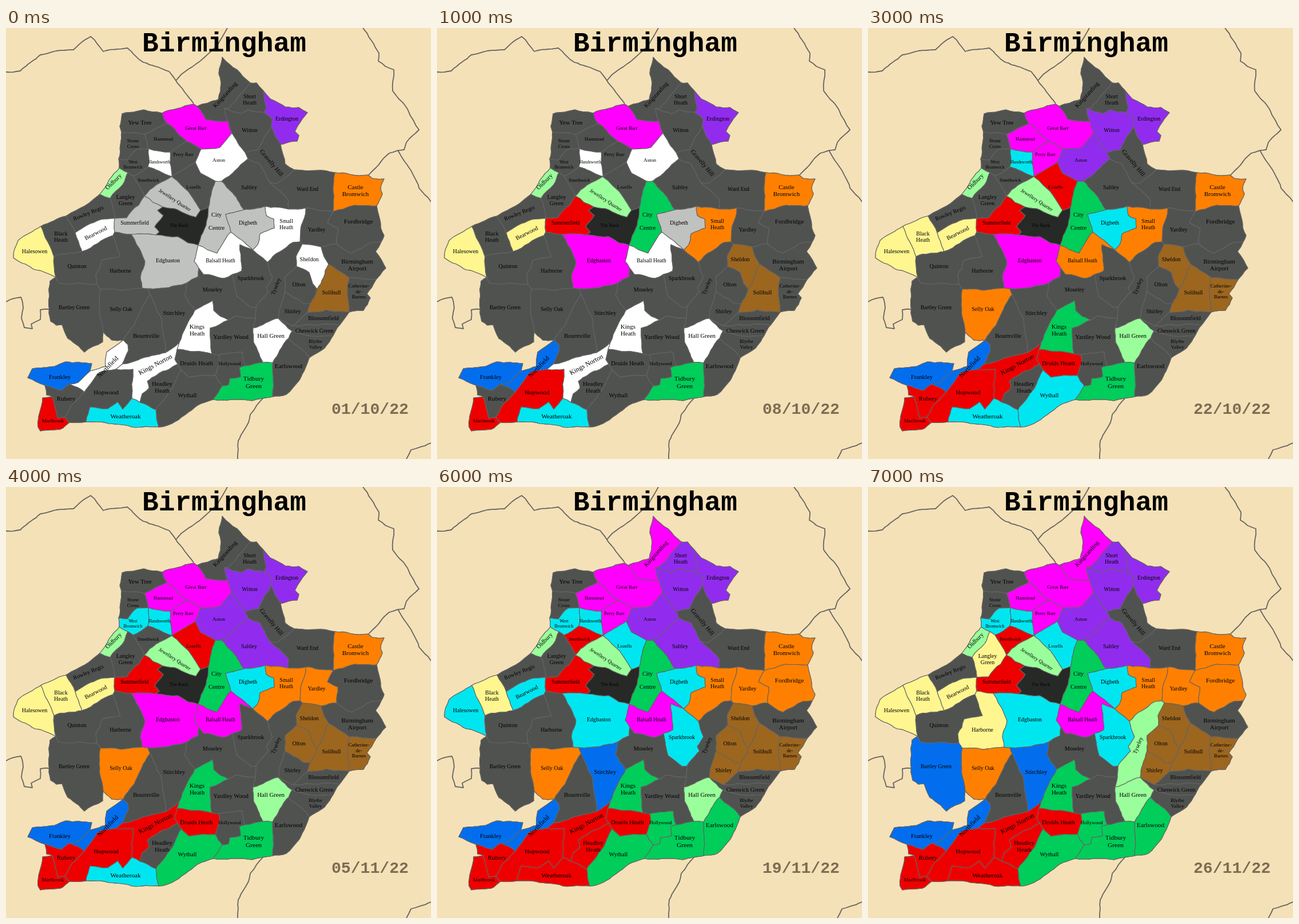
Write an HTML page that moves like this. It is 743 px wide and 754 px high and loops after 8000 ms.

```html
<!DOCTYPE html>
<html lang="en">
<head>
<meta charset="utf-8">
<title>Territory map</title>
<style>
html, body { margin: 0; width: 100%; height: 100%; overflow: hidden; background: #f5e1b7; }
svg { display: block; width: 100vw; height: 100vh; }
#roads, #map, #rim { stroke: #646464; stroke-linejoin: round; }
#roads { fill: none; stroke-width: 1.8; }
#rim { stroke-width: 3.6; }
#map { stroke-width: 1.1; }
#labels { font-family: "Liberation Serif", serif; text-anchor: middle; }
.mono { font-family: "Liberation Mono", monospace; font-weight: bold; }
</style>
</head>
<body>
<svg viewBox="0 0 743 754">
  <g id="roads"></g>
  <use id="rim" href="#map"/>
  <g id="map"></g>
  <g id="labels"></g>
  <text class="mono" x="238" y="41" font-size="47.8">Birmingham</text>
  <text class="mono" id="date" x="569" y="675" font-size="28.1" fill="#7d6c53"></text>
</svg>
<script>
const $ = id => document.getElementById(id);
const areas = {};

function add(parent, tag, attrs) {
  const el = document.createElementNS('http://www.w3.org/2000/svg', tag);
  for (const k in attrs) el.setAttribute(k, attrs[k]);
  return parent.appendChild(el);
}

// Seeded value from -1 to 1
function noise(a, b) {
  const s = Math.sin(a * 12.9898 + b * 78.233) * 43758.5453;
  return (s - Math.floor(s)) * 2 - 1;
}

// Midpoint displacement; the same in both directions, so neighbours share one border
function wiggle(a, b) {
  const len = Math.hypot(a[0] - b[0], a[1] - b[1]);
  if (len < 10) return [b];
  const sx = a[0] + b[0], sy = a[1] + b[1], push = Math.min(len, 30) * 0.06;
  const mid = [sx / 2 + noise(sx, sy) * push, sy / 2 + noise(sy, sx) * push];
  return [...wiggle(a, mid), ...wiggle(mid, b)];
}

function coast(keys, closed) {
  const pts = keys.split(' ').map(p => p.split(',').map(Number));
  if (closed) pts.push(pts[0]);
  const line = pts.flatMap((p, i) => i ? wiggle(pts[i - 1], p) : [p]);
  return 'M' + line.map(p => p.map(v => v.toFixed(1))).join('L') + (closed ? 'Z' : '');
}

const road = keys => add($('roads'), 'path', { d: coast(keys) });

// "|" breaks the label into lines; x, y is its centre
function area(name, x, y, keys, size = 10, turn = 0) {
  const key = name.replace(/-\|/g, '-').replace(/\|+/g, ' ');
  areas[key] = add($('map'), 'path', { d: coast(keys, true) });
  const lines = name.split('|');
  const label = add($('labels'), 'text', { 'font-size': size, transform: `translate(${x} ${y}) rotate(${turn})` });
  lines.forEach((line, i) => {
    const dy = (i - (lines.length - 1) / 2) * size * 1.1 + size * 0.3;
    add(label, 'tspan', { x: 0, y: dy }).textContent = line;
  });
}

road('0,77 25,75 60,47 88,40 118,38 148,15 170,41 212,35 240,60 285,76 297,92 328,132');
road('297,92 345,53 370,30 387,0');
road('624,0 652,44 651,58 678,73 676,110 702,142 722,178 700,200 696,213 670,219 634,257');
road('685,214 701,239 722,280 743,304');
road('0,479 26,471 30,490 27,508 32,524 46,526 44,518 60,510 60,493 75,492');
road('450,647 427,676 424,690 406,722 405,754');
road('700,754 708,738 743,726');

area('Kingstanding', 383, 117, '378,51 404,73 427,96 406,120 390,140 382,141 388,163 349,160 334,137 371,125 376,96 372,80', 10.6, -48);
area('Short|Heath', 426, 125, '427,96 438,96 450,110 455,140 451,148 423,143 411,150 382,141 390,140 406,120');
area('Erdington', 491, 159, '450,110 462,124 488,138 512,139 527,148 515,164 505,181 512,188 509,198 480,204 464,172 465,159 451,148 455,140');
area('Witton', 426, 179, '382,141 411,150 423,143 451,148 465,159 464,172 441,213 418,218 395,184 388,163');
area('Gravelly Hill', 464, 236, '464,172 480,204 488,238 504,248 474,272 461,270 444,238 423,229 418,218 441,213', 10.8, 50);
area('Great Barr', 332, 175, '273,149 328,133 334,137 349,160 388,163 395,184 374,209 341,212 316,198 292,174 281,167', 8.8);
area('Yew Tree', 234, 166, '203,150 241,143 273,149 281,167 242,186 202,182 199,172', 10.8);
area('Stone|Cross', 222, 202, '202,182 242,186 249,211 229,212 212,231 197,229', 9);
area('Hamstead', 275, 194, '281,167 292,174 316,198 287,217 249,211 242,186', 8.5);
area('Perry Barr', 310, 221, '316,198 341,212 331,235 290,260 287,217', 8.5);
area('Handsworth', 268, 235, '249,211 287,217 290,260 248,243', 7.8);
area('West|Bromwich', 222, 239, '197,229 212,231 229,212 249,211 248,243 222,259 213,253 198,245', 7.8);
area('Smethwick', 249, 266, '248,243 290,260 262,275 242,294 222,259', 8.3);
area('Aston', 372, 231, '341,212 374,209 395,184 418,218 423,229 377,268 366,268 340,254 331,235', 9.2);
area('Lozells', 328, 278, '331,235 340,254 366,268 354,314 340,319 322,291 290,260', 8.6);
area('Oldbury', 188, 269, '198,245 213,253 204,274 182,298 164,291 180,266', 10.5, -45);
area('Langley|Green', 209, 301, '213,253 222,259 242,294 232,310 211,332 190,333 182,298 204,274');
area('Rowley Regis', 144, 324, '164,291 182,298 190,333 166,335 121,358 105,329 138,311', 10, -22);
area('Jewellery Quarter', 295, 301, '290,260 322,291 340,319 332,331 300,318 274,313 242,294 262,275', 9.1, 33);
area('Summerfield', 225, 341, '242,294 274,313 265,319 275,328 260,348 268,357 262,362 219,361 190,357 190,333 211,332 232,310', 9.5);
area('The Rack', 302, 345, '274,313 300,318 332,331 340,319 354,314 350,345 336,380 318,376 300,365 262,362 268,357 260,348 275,328 265,319', 8.4);
area('City||Centre', 368, 338, '366,268 377,268 396,288 416,318 384,326 393,357 369,394 336,380 350,345 354,314', 10.6);
area('Saltley', 425, 279, '423,229 444,238 461,270 494,301 494,317 453,312 416,318 396,288 377,268');
area('Ward End', 527, 282, '504,248 575,253 573,270 572,321 524,315 494,317 494,301 461,270 474,272', 9.5);
area('Castle|Bromwich', 611, 285, '575,253 633,257 640,263 661,264 655,283 658,290 648,311 610,310 572,321 573,270', 11);
area('Fordbridge', 616, 339, '572,321 610,310 648,311 655,349 661,363 656,374 640,375 605,394 578,378 580,350 562,341', 11.4);
area('Yardley', 543, 353, '524,315 572,321 562,341 580,350 578,378 551,383 518,378 514,374 516,346');
area('Small|Heath', 490, 343, '453,312 494,317 524,315 516,346 514,374 502,375 457,410 431,388 440,379 444,360 469,350 468,334 455,328');
area('Digbeth', 423, 341, '453,312 455,328 468,334 469,350 444,360 440,379 431,388 393,357 384,326 416,318');
area('Halesowen', 50, 391, '61,347 84,400 87,436 51,423 13,402 21,372');
area('Black|Heath', 96, 365, '61,347 105,329 121,358 133,391 84,400');
area('Bearwood', 157, 359, '121,358 166,335 190,333 190,357 187,363 133,391', 10.3, -27);
area('Quinton', 124, 417, '84,400 133,391 187,363 200,400 168,406 157,432 159,448 92,446 87,436');
area('Harborne', 200, 425, '187,363 190,357 219,361 228,378 243,408 235,436 238,455 200,459 165,457 159,448 157,432 168,406 200,400');
area('Edgbaston', 283, 407, '219,361 262,362 300,365 318,376 336,380 329,408 337,420 336,435 316,446 285,454 248,456 238,455 235,436 243,408 228,378');
area('Balsall Heath', 375, 407, '336,380 369,394 393,357 431,388 409,379 412,425 396,431 381,438 345,431 337,420 329,408', 9.5);
area('Sparkbrook', 428, 438, '409,379 431,388 457,410 466,437 455,454 459,462 437,488 429,489 404,470 396,431 412,425');
area('Tyseley', 472, 452, '457,410 502,375 514,374 518,378 507,400 508,417 488,435 488,462 476,508 432,525 436,508 437,488 459,462 455,454 466,437', 10, -68);
area('Sheldon', 530, 405, '518,378 551,383 564,413 544,457 536,447 530,428 508,417 507,400');
area('Olton', 512, 449, '508,417 530,428 536,447 544,457 532,482 520,482 488,462 488,435');
area('Shirley', 501, 496, '488,462 520,482 532,482 527,498 500,521 476,508');
area('Solihull', 569, 463, '564,413 600,437 597,460 600,497 560,493 527,498 532,482 544,457', 10.4);
area('Birmingham|Airport', 614, 415, '551,383 578,378 605,394 640,375 656,374 646,391 664,420 647,440 600,437 564,413', 11);
area('Catherine-|de-|Barnes', 617, 461, '600,437 647,440 631,465 637,472 625,494 600,497 597,460', 8.8);
area('Blossomfield', 555, 508, '527,498 560,493 600,497 592,508 583,520 550,519 500,521');
area('Cheswick Green', 539, 530, '476,508 500,521 550,519 583,520 572,538 535,539 500,530');
area('Blythe|Valley', 541, 553, '500,530 535,539 572,538 557,560 530,577 494,543', 9);
area('Moseley', 361, 458, '316,446 336,435 337,420 345,431 381,438 396,431 404,470 429,489 437,488 436,508 400,504 389,511 363,494 361,477 330,494 312,468');
area('Bartley Green', 119, 489, '87,436 92,446 159,448 165,457 163,485 170,532 169,549 137,567 108,543 98,519 88,520 78,513 75,499 77,443', 9.6);
area('Selly Oak', 201, 492, '165,457 200,459 238,455 248,456 252,466 224,520 205,546 185,546 170,532 163,485');
area('Stirchley', 294, 499, '248,456 285,454 316,446 312,468 330,494 303,550 279,568 272,510 252,466', 10.8);
area('Bournville', 245, 539, '252,466 272,510 279,568 240,577 203,588 214,564 213,554 205,546 224,520', 10.8);
area('Kings|Heath', 334, 529, '361,477 363,494 389,511 357,525 358,550 360,570 299,562 303,550 330,494', 11);
area('Yardley Wood', 393, 541, '389,511 400,504 436,508 432,525 433,550 449,585 418,591 413,567 372,572 360,570 358,550 357,525', 10.8);
area('Hall Green', 463, 539, '476,508 500,530 494,543 466,586 449,585 433,550 432,525', 10.8);
area('Earlswood', 494, 592, '494,543 530,577 513,616 490,641 466,645 467,610 466,586', 11.3);
area('Tidbury|Green', 433, 620, '418,591 449,585 466,586 467,610 466,645 430,652 362,650 378,626 389,624 391,613 410,610 408,594', 11.4);
area('Hollywood', 391, 587, '372,572 413,567 418,591 408,594 410,610 391,613 389,624 378,626 366,608 374,585', 8.7);
area('Druids Heath', 333, 587, '299,562 360,570 372,572 374,585 366,608 320,611 306,598 300,588 295,580', 10.8);
area('Wythall', 317, 643, '306,598 320,611 366,608 378,626 362,650 335,660 290,692 267,698 262,668 291,630', 10.4);
area('Headley|Heath', 273, 629, '300,588 306,598 291,630 262,668 234,655 238,640 250,630 247,618 285,597', 10.8);
area('Kings Norton', 261, 589, '303,550 299,562 295,580 300,588 285,597 247,618 250,630 238,640 234,655 220,648 222,597 192,597 203,588 240,577 279,568', 11.8, -28);
area('Northfield', 178, 593, '205,546 213,554 214,564 203,588 192,597 160,605 137,637 111,623 126,620 147,600 174,592 176,567', 11.4, -46);
area('Frankley', 94, 611, '38,612 46,596 85,592 104,584 150,587 147,600 126,620 111,623 97,634 68,625', 10.7);
area('Rubery', 105, 649, '68,625 97,634 111,623 137,637 112,664 103,681 90,683 84,655 81,645 71,642', 11);
area('Marlbrook', 82, 687, '64,647 81,645 84,655 90,683 103,681 111,690 95,702 60,705 56,698', 9);
area('Hopwood', 175, 638, '111,690 103,681 112,664 137,637 160,605 192,597 222,597 220,648 204,667 195,654 178,666 147,663 140,689', 11);
area('Weatheroak', 209, 680, '147,663 178,666 195,654 204,667 220,648 234,655 262,668 267,698 220,698 140,689', 11.2);

const colours = {
  dark: '#505250', white: '#ffffff', grey: '#c0c2c0', black: '#272927',
  pink: '#ff00ff', purple: '#912cee', orange: '#ff8000', yellow: '#fff68f',
  mint: '#9aff9a', green: '#00cd5a', cyan: '#00e6f0', blue: '#026eee',
  red: '#ee0000', brown: '#9c661f'
};

// Each week lists only the areas that change hands
const weeks = [
  { date: '01/10/22', pink: 'Great Barr', purple: 'Erdington', orange: 'Castle Bromwich', yellow: 'Halesowen',
    mint: 'Oldbury', green: 'Tidbury Green', cyan: 'Weatheroak', blue: 'Frankley', red: 'Marlbrook', brown: 'Solihull',
    black: 'The Rack', grey: 'Jewellery Quarter,Summerfield,City Centre,Digbeth,Edgbaston',
    white: 'Aston,Handsworth,Bearwood,Small Heath,Balsall Heath,Sheldon,Kings Heath,Hall Green,Northfield,Kings Norton' },
  { date: '08/10/22', mint: 'Jewellery Quarter', red: 'Hopwood,Summerfield', yellow: 'Bearwood', pink: 'Edgbaston',
    green: 'City Centre', orange: 'Small Heath', brown: 'Sheldon', blue: 'Northfield' },
  { date: '15/10/22', pink: 'Perry Barr', cyan: 'Handsworth', purple: 'Aston', red: 'Lozells,Kings Norton,Rubery',
    green: 'Balsall Heath', orange: 'Kings Heath', mint: 'Hall Green', yellow: 'Black Heath' },
  { date: '22/10/22', pink: 'Hamstead', purple: 'Witton', cyan: 'Digbeth,Wythall', orange: 'Balsall Heath,Selly Oak',
    brown: 'Catherine-de-Barnes', green: 'Kings Heath', red: 'Druids Heath' },
  { date: '05/11/22', cyan: 'West Bromwich', green: 'Wythall', orange: 'Yardley', brown: 'Olton', pink: 'Balsall Heath',
    purple: 'Saltley' },
  { date: '12/11/22', red: 'Smethwick', orange: 'Fordbridge', brown: 'Shirley', green: 'Hollywood', blue: 'Stirchley' },
  { date: '19/11/22', pink: 'Kingstanding', purple: 'Short Heath', cyan: 'Lozells,Halesowen,Bearwood,Edgbaston,Sparkbrook',
    red: 'Weatheroak,Headley Heath', green: 'Earlswood' },
  { date: '26/11/22', yellow: 'Halesowen,Bearwood,Langley Green,Harborne', blue: 'Bartley Green', mint: 'Tyseley' }
];

function show(week) {
  const owner = {};
  for (const { date, ...gains } of weeks.slice(0, week + 1)) {
    for (const team in gains) for (const name of gains[team].split(',')) owner[name] = team;
  }
  for (const name in areas) areas[name].setAttribute('fill', colours[owner[name] || 'dark']);
  $('date').textContent = weeks[week].date;
}

let shown = -1;
const start = performance.now();
function tick(now) {
  const week = Math.floor(Math.max(0, now - start) / 1000) % weeks.length;
  if (week !== shown) show(shown = week);
  requestAnimationFrame(tick);
}
tick(start);
</script>
</body>
</html>
```
